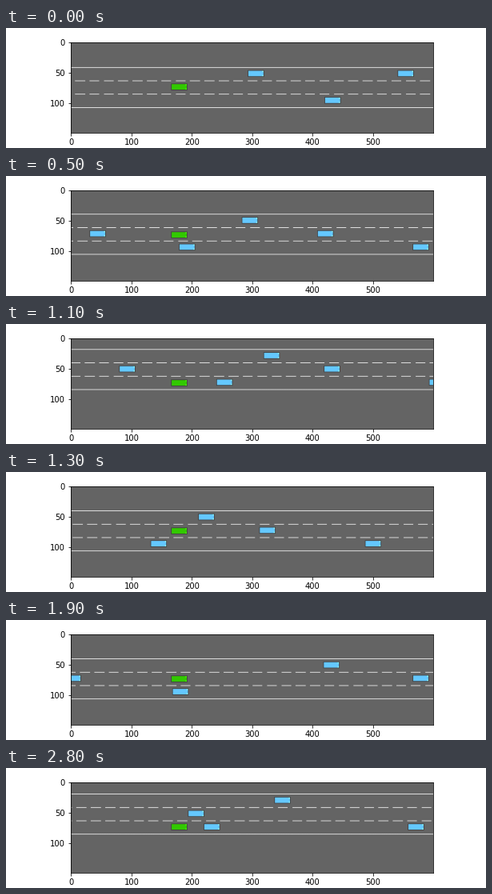
Write a matplotlib script that moves like this. It is 600 px wide and 150 px high and loops after 2.9 s.

```python
import math

import matplotlib.pyplot as plt
import numpy as np
from matplotlib.animation import FuncAnimation

W, H, DPI = 600, 150, 72
FRAMES, INTERVAL = 29, 100

ASPHALT, WHITE, EDGE = (100, 100, 100), (255, 255, 255), (60, 60, 60)
GREEN, BLUE = (50, 200, 0), (100, 200, 255)

LANE = 22
DASH, DASH_PERIOD = 16.5, 23.8
CAR_L, CAR_W = 27, 11
EGO_X, EGO_Y = 166, 69
PASS_X = 180

# steps at which the green car swaps between the middle and lower lane
SWITCHES = (2, 5, 8, 12, 14, 18, 23)

# steps at which the cars of each lane come level with the green car
PASSES = (
    (6.87, 13.57, 23.53, 31.05),
    (9.17, 15.46),
    (12.12, 18.77, 28.78, 35.45),
)


def progress(step):
    """Elapsed travel; the first step is shorter while speed builds up."""
    return max(step - 0.3, 0)


def car_x(step, level, pace=1):
    """Left edge of a car that is level with the green one at a given time."""
    speed = pace * (56 - 0.15 * level)
    return PASS_X + speed * (level - 0.3 - progress(step))


def road_top(step):
    """Row of the upper side line; it settles slowly after each lane change."""
    past = [s for s in SWITCHES if s <= step]
    lane = 1 + len(past) % 2
    lag = int(2.2 * math.exp((past[-1] - step) / 4)) if past else 0
    return EGO_Y - 5 - LANE * lane - lag


def traffic(step):
    for lane, levels in enumerate(PASSES):
        for level in levels:
            yield lane, car_x(step, level)
    yield 2, car_x(step, 4.98, pace=0.93)
    yield 1, car_x(step, 28.33, pace=0.8)
    yield min(1, 0.6 * step), car_x(step, 2.33)  # merges from the top lane


def fill(img, x, y, w, h, color):
    img[y:y + h, max(x, 0):max(x + w, 0)] = color


def draw_car(img, x, y, color):
    x, y = round(x), round(y)
    light = [min(int(c / 0.68), 255) for c in color]
    fill(img, x, y, CAR_L, CAR_W, EDGE)
    fill(img, x + 1, y + 1, CAR_L - 2, CAR_W - 2, color)
    for dy in (1, 8):
        fill(img, x + CAR_L - 3, y + dy, 2, 2, light)


def draw_road(img, step, top):
    img[:] = ASPHALT
    img[[top, top + 3 * LANE]] = WHITE
    phase = 6.6 + 2 * (step - 3 * min(step, 1))
    dashed = (np.arange(W) - phase) % DASH_PERIOD < DASH
    for k in (1, 2):
        img[top + k * LANE, dashed] = WHITE


def render(step):
    img = np.empty((H, W, 3), np.uint8)
    top = road_top(step)
    draw_road(img, step, top)
    for lane, x in traffic(step):
        draw_car(img, x, top + 5 + LANE * lane, BLUE)
    draw_car(img, EGO_X, EGO_Y, GREEN)
    return img


plt.rcParams.update({"font.family": "DejaVu Sans", "font.size": 10})
fig = plt.figure(figsize=(W / DPI, H / DPI), dpi=DPI, facecolor="white")
ax = fig.add_axes([81 / W, 18.75 / H, 453 / W, 113.25 / H])
view = ax.imshow(render(0), aspect="auto")
ax.set_xticks(range(0, W, 100))
ax.set_yticks(range(0, H, 50))


def update(step):
    view.set_data(render(step))
    return [view]


anim = FuncAnimation(fig, update, frames=FRAMES, interval=INTERVAL,
                     repeat=True, repeat_delay=0, blit=False)
plt.show()
```
